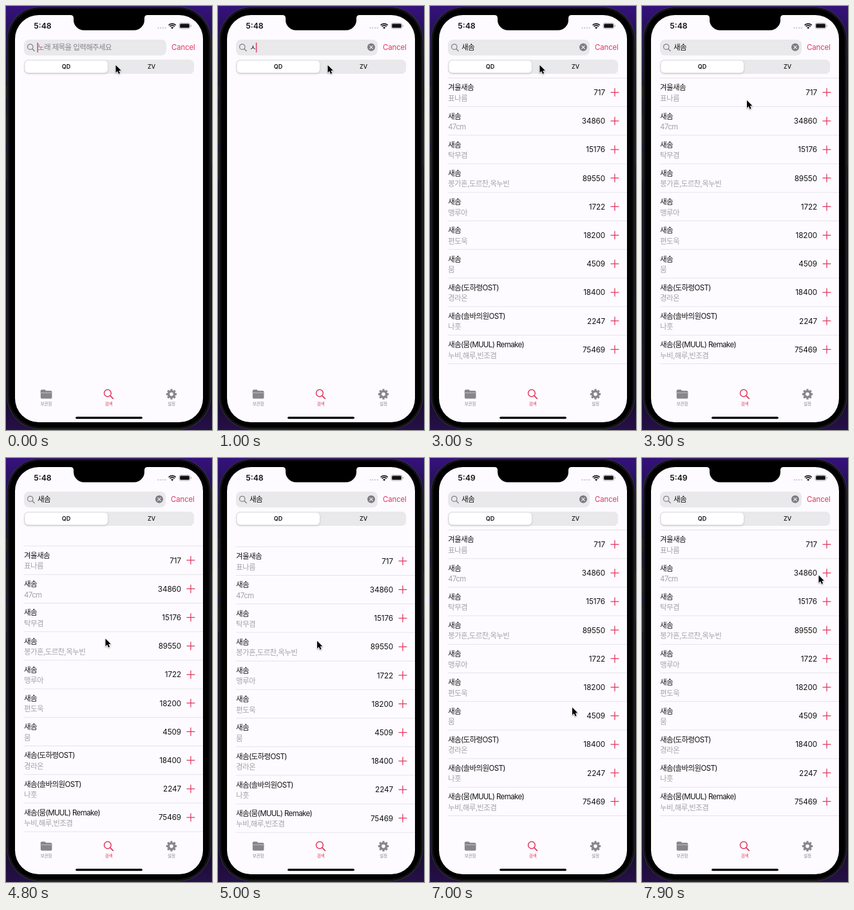
An HTML page with a canvas for the animation above (8000 ms loop, 320 px wide and 656 px high).

```html
<!DOCTYPE html>
<html lang="ko">
<head>
<meta charset="utf-8">
<title>Song search</title>
<style>
html, body { margin: 0; width: 100%; height: 100%; overflow: hidden; background: #120a26; }
canvas { display: block; width: 320px; height: 656px; }
</style>
</head>
<body>
<canvas id="stage"></canvas>
<script>
const W = 320, H = 656, LOOP = 8000;
const PINK = '#e2365f', GRAY = '#87868b', FIELD = '#e9e8eb', PAPER = '#fdfbff', LINE = '#e2e1e5';
const FONT = 'Inter, "Noto Sans CJK KR", "Noto Sans CJK", sans-serif';

const canvas = document.getElementById('stage');
const ctx = canvas.getContext('2d');
const dpr = window.devicePixelRatio || 1;
canvas.width = W * dpr;
canvas.height = H * dpr;

const songs = [
  ['겨울새솜', '표나름', '717'],
  ['새솜', '47cm', '34860'],
  ['새솜', '탁무겸', '15176'],
  ['새솜', '봉가흔,도르찬,옥누빈', '89550'],
  ['새솜', '맹루아', '1722'],
  ['새솜', '편도욱', '18200'],
  ['새솜', '뭄', '4509'],
  ['새솜(도하령OST)', '경라온', '18400'],
  ['새솜(솔바의원OST)', '나훗', '2247'],
  ['새솜(뭄(MUUL) Remake)', '누비,해루,빈조겸', '75469']
];

// Each key: time, then values.
const typing = [[0, ''], [1000, 'ㅅ'], [1250, '새'], [1500, '샛'], [1750, '새소'], [2000, '새솜']];
const RESULTS = 2900, SUBMIT = 2800, MINUTE = 6500;
const pointerKeys = [
  [0, 170.5, 91.5], [3350, 170.5, 91.5], [3850, 163, 146], [4000, 163, 146],
  [4350, 160, 232], [4800, 154.5, 279.5], [5000, 154, 283], [5450, 108.5, 269.5],
  [6050, 109, 270], [6700, 228, 406], [7000, 221, 386], [7200, 225, 404],
  [7600, 296, 192], [7850, 274.5, 181.5]
];
const pullKeys = [[4350, 0], [4800, 24.6], [5000, 26]];

function sample(keys, t) {
  let i = 0;
  while (i < keys.length - 1 && keys[i + 1][0] <= t) i++;
  const a = keys[i], b = keys[i + 1];
  if (!b || t <= a[0]) return a.slice(1);
  const p = (t - a[0]) / (b[0] - a[0]);
  const e = p * p * (3 - 2 * p);
  return a.slice(1).map((v, k) => v + (b[k + 1] - v) * e);
}

function pullOffset(t) {
  if (t <= 5000) return sample(pullKeys, t)[0];
  const p = Math.min(1, (t - 5000) / 420);
  return 26 * Math.pow(1 - p, 3);
}

function box(x, y, w, h, r, fill) {
  ctx.beginPath();
  ctx.roundRect(x, y, w, h, r);
  ctx.fillStyle = fill;
  ctx.fill();
}

function disc(x, y, r, fill) {
  ctx.beginPath();
  ctx.arc(x, y, r, 0, Math.PI * 2);
  ctx.fillStyle = fill;
  ctx.fill();
}

function stroke(points, color, width, cap = 'butt') {
  ctx.beginPath();
  for (const [x1, y1, x2, y2] of points) {
    ctx.moveTo(x1, y1);
    ctx.lineTo(x2, y2);
  }
  ctx.strokeStyle = color;
  ctx.lineWidth = width;
  ctx.lineCap = cap;
  ctx.stroke();
}

function label(str, x, y, size, color, { weight = 400, align = 'left', track = 0 } = {}) {
  ctx.font = `${weight} ${size}px ${FONT}`;
  ctx.letterSpacing = track + 'px';
  ctx.textAlign = align;
  ctx.fillStyle = color;
  ctx.fillText(str, x, y);
  return ctx.measureText(str).width;
}

const body = (str, x, y, color) => label(str, x, y, 11.5, color, { track: -0.6 });

function lens(x, y, r, tail, color, width) {
  ctx.beginPath();
  ctx.arc(x, y, r, 0, Math.PI * 2);
  ctx.strokeStyle = color;
  ctx.lineWidth = width;
  ctx.stroke();
  const d = r * 0.72;
  stroke([[x + d, y + d, x + tail, y + tail]], color, width * 1.15, 'round');
}

function drawPhone() {
  const wall = ctx.createLinearGradient(0, 0, 0, H);
  [[0, '#35127c'], [0.1, '#1d1046'], [0.2, '#0c0a1c'], [0.32, '#12143a'],
   [0.45, '#0b0818'], [0.9, '#120925'], [1, '#261048']].forEach(s => wall.addColorStop(...s));
  ctx.fillStyle = wall;
  ctx.fillRect(0, 0, W, H);

  for (const [x, y, h] of [[0, 124, 20], [0, 168, 44], [0, 225, 44], [318, 178, 70]])
    box(x, y, 2, h, 1, '#1b1a20');
  box(1.5, 1, 317, 654, 51, '#37363c');
  box(2.5, 2, 315, 652, 50, '#0b0b0d');
  box(4, 3.5, 312, 649, 48.5, '#1e1e21');
  box(4.8, 4.3, 310.4, 647.4, 48, '#000');
  box(14, 14, 292, 630, 37, PAPER);

  ctx.beginPath();
  ctx.moveTo(100, 13);
  ctx.lineTo(100, 14);
  ctx.quadraticCurveTo(105, 14, 105, 19);
  ctx.arcTo(105, 37.5, 122, 37.5, 16);
  ctx.arcTo(215, 37.5, 215, 20, 16);
  ctx.lineTo(215, 19);
  ctx.quadraticCurveTo(215, 14, 220, 14);
  ctx.lineTo(220, 13);
  ctx.fillStyle = '#000';
  ctx.fill();
}

function drawStatus(t) {
  label(t < MINUTE ? '5:48' : '5:49', 57, 35.2, 12.2, '#111', { weight: 600, align: 'center' });
  for (let i = 0; i < 4; i++) disc(236.6 + i * 3.7, 33.8, 1.1, '#c3c2c6');

  ctx.save();
  ctx.beginPath();
  ctx.moveTo(258.2, 35.4);
  ctx.lineTo(249, 26);
  ctx.lineTo(267.4, 26);
  ctx.clip();
  ctx.strokeStyle = '#111';
  ctx.lineWidth = 1.7;
  for (const r of [5.2, 8]) {
    ctx.beginPath();
    ctx.arc(258.2, 35.4, r, Math.PI, 0);
    ctx.stroke();
  }
  disc(258.2, 35.4, 2.8, '#111');
  ctx.restore();

  ctx.beginPath();
  ctx.roundRect(269, 26.4, 17, 8.6, 2.6);
  ctx.strokeStyle = '#a5a4a8';
  ctx.lineWidth = 0.8;
  ctx.stroke();
  box(270.2, 27.6, 14.6, 6.2, 1.5, '#111');
  box(287, 29.3, 1, 2.8, 0.5, '#a5a4a8');
}

function drawSearch(t) {
  const key = typing.filter(k => k[0] <= t).pop();
  const text = key[1];
  const shift = text ? 1 : 0;
  box(28, 52, 221 - shift, 24.5, 7.5, FIELD);
  lens(37.7, 63.2, 4.2, 6.4, '#828186', 1.25);
  let end = 49;
  if (text) {
    end += body(text, 49, 68, '#111') + 0.4;
    disc(238, 63.8, 6, '#7c7b80');
    stroke([[235.8, 61.6, 240.2, 66], [240.2, 61.6, 235.8, 66]], FIELD, 1.2, 'round');
  } else {
    body('노래 제목을 입력해주세요', 49, 68, '#858489');
  }
  const blinkOn = (t - key[0]) % 1000 < 550;
  if (t < SUBMIT && blinkOn) box(end - 0.5, 56.5, 1.4, 15.5, 0.7, PINK);
  label('Cancel', 257 - shift, 67.9, 11.4, PINK, { track: -0.1 });
}

function drawSegments() {
  box(28, 83, 264, 22, 6.5, FIELD);
  ctx.save();
  ctx.shadowColor = 'rgba(0,0,0,.2)';
  ctx.shadowBlur = 3 * dpr;
  ctx.shadowOffsetY = dpr;
  box(29.3, 84.4, 128.7, 19.2, 5.5, '#fff');
  ctx.restore();
  label('QD', 93.6, 97.3, 9, '#111', { weight: 600, align: 'center' });
  label('ZV', 226, 97.3, 9, '#111', { weight: 500, align: 'center' });
}

function drawList(t) {
  if (t < RESULTS) return;
  ctx.save();
  ctx.beginPath();
  ctx.rect(14, 110, 292, 470);
  ctx.clip();
  ctx.translate(0, pullOffset(t));
  stroke([[28, 111.5, 306, 111.5]], LINE, 0.9);
  songs.forEach(([title, singer, code], i) => {
    const y = 111.5 + i * 44.2;
    body(title, 28, y + 18.8, '#111');
    body(singer, 28, y + 35.2, '#a3a2a7');
    label(code, 272, y + 26.5, 11.8, '#111', { align: 'right', track: -0.15 });
    stroke([[281, y + 22.1, 293, y + 22.1], [287, y + 16.1, 287, y + 28.1]], PINK, 1.25, 'round');
    stroke([[28, y + 44.2, 306, y + 44.2]], LINE, 0.9);
  });
  ctx.restore();
}

function drawGear(x, y) {
  ctx.beginPath();
  for (let i = 0; i < 8; i++) {
    const a = i * Math.PI / 4;
    for (const [da, r] of [[-0.25, 6.3], [-0.18, 8.3], [0.18, 8.3], [0.25, 6.3]])
      ctx.lineTo(x + Math.cos(a + da) * r, y + Math.sin(a + da) * r);
  }
  ctx.closePath();
  ctx.moveTo(x + 2.8, y);
  ctx.arc(x, y, 2.8, 0, Math.PI * 2, true);
  ctx.fillStyle = GRAY;
  ctx.fill('evenodd');
}

function drawTabs() {
  box(53.8, 593.6, 8, 6, 1.8, GRAY);
  box(53.8, 595.2, 17.6, 4, [1, 1.8, 0, 0], GRAY);
  box(53.8, 598.4, 17.6, 9.2, [0, 0, 1.8, 1.8], GRAY);
  stroke([[53.8, 598.5, 71.4, 598.5]], '#c9c8cc', 0.8);
  lens(157.9, 599, 5.4, 8.4, PINK, 1.5);
  drawGear(257, 600.6);
  [['보관함', 62.6, GRAY], ['검색', 159.6, PINK], ['설정', 257, GRAY]].forEach(([s, x, c]) =>
    label(s, x, 618.4, 6.6, c, { weight: 500, align: 'center', track: -0.1 }));
  box(108, 635.4, 104, 3.4, 1.7, '#000');
}

const arrow = [[0, 0], [0, 11.8], [2.7, 9.3], [4.6, 13.4], [6.6, 12.5], [4.8, 8.5], [8.3, 8.3]];

function drawPointer(t) {
  const [x, y] = sample(pointerKeys, t);
  ctx.save();
  ctx.translate(x, y);
  ctx.beginPath();
  arrow.forEach(p => ctx.lineTo(...p));
  ctx.closePath();
  ctx.lineJoin = 'round';
  ctx.strokeStyle = '#fff';
  ctx.lineWidth = 1.5;
  ctx.shadowColor = 'rgba(0,0,0,.35)';
  ctx.shadowBlur = 2 * dpr;
  ctx.shadowOffsetY = dpr;
  ctx.stroke();
  ctx.shadowColor = 'transparent';
  ctx.fillStyle = '#000';
  ctx.fill();
  ctx.restore();
}

function draw(t) {
  ctx.setTransform(dpr, 0, 0, dpr, 0, 0);
  drawPhone();
  drawStatus(t);
  drawSearch(t);
  drawSegments();
  drawList(t);
  drawTabs();
  drawPointer(t);
}

const start = performance.now();
function tick() {
  draw((performance.now() - start) % LOOP);
  requestAnimationFrame(tick);
}
tick();
</script>
</body>
</html>
```
